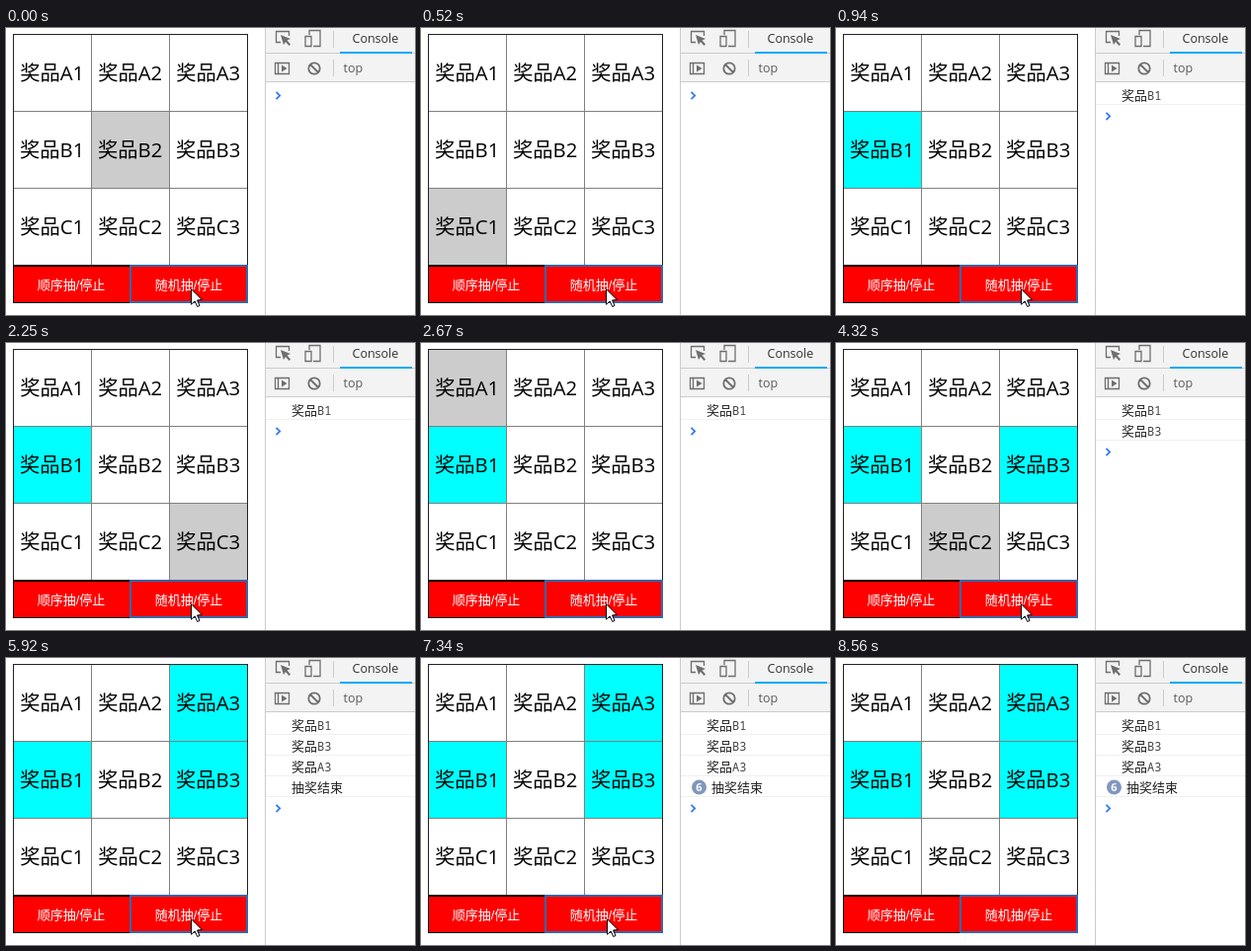
These frames come from a looping animation (414 px wide and 291 px high, 8690 ms). An HTML page with a canvas:

```html
<!DOCTYPE html>
<html lang="zh-CN">
<head>
<meta charset="utf-8">
<title>抽奖</title>
<style>
html, body { margin: 0; width: 100%; height: 100%; overflow: hidden; background: #fff; }
canvas { display: block; }
</style>
</head>
<body>
<canvas id="stage" width="414" height="291"></canvas>
<script>
const ctx = document.getElementById('stage').getContext('2d');
const LOOP = 8690;
const CJK = '"Noto Sans CJK SC", "Noto Sans CJK", "Noto Sans CJK JP", sans-serif';
const UI = '"Open Sans", ' + CJK;
const INK = '#6e6e6e';

// The highlight hops along a path at a steady pace until the draw is stopped.
const HOP = 135;
const rounds = [
  { start: -20, stop: 940, prize: 'B1', path: 'B2 A1 B3 A2 C1 C2 B2' },
  { start: 2250, stop: 3210, prize: 'B3', path: 'C3 B2 C2 A1 A3 C2 A1' },
  { start: 4050, stop: 4900, prize: 'A3', path: 'C1 B2 C2 A2' }
];
const FINISHED = 5920;
const REPEAT = { start: 6640, every: 175, max: 6 };
const LEAVE = 7460, ENTER = 7990, POINTER_STEP = 140;

const icons = {
  inspect: new Path2D('M278 14.5h-4.5v-11h13v4.5'),
  arrow: new Path2D('M278 7l10 4-3.5 1.5 3.5 4-1.5 1.5-3.5-4-2 3z'),
  devices: new Path2D('M307 7v-4.5h11v16h-7M303 8.5h6v10h-6z'),
  sidebar: new Path2D('M272.5 35.5h14v11h-14zM275.5 35v12'),
  play: new Path2D('M279 37.5l5.5 3.5-5.5 3.5z'),
  clear: new Path2D('M317.7 41a5.7 5.7 0 1 1-11.4 0a5.7 5.7 0 1 1 11.4 0M308 37l8 8'),
  prompt: new Path2D('M-3.7-3.7L0 0L-3.7 3.7'),
  pointer: new Path2D('M.5.8v15.5l3.7-3.4 2.5 5.6 2.3-1-2.4-5.5 4.7-.4z')
};

function activeCell(t) {
  const round = rounds.find(r => t >= r.start && t < r.stop);
  if (!round) return '';
  const path = round.path.split(' ');
  return path[Math.min(path.length - 1, Math.floor((t - round.start) / HOP))];
}

const prizesAt = t => rounds.filter(r => t >= r.stop).map(r => r.prize);

function repeatCount(t) {
  if (t < REPEAT.start) return 1;
  return Math.min(REPEAT.max, 2 + Math.floor((t - REPEAT.start) / REPEAT.every));
}

function pointerAt(t) {
  if (t < LEAVE) return [t < 7190 ? 187 : 188, 264];
  if (t < LEAVE + 120) return [222, 240];
  const p = Math.floor((t - ENTER) / POINTER_STEP) / 3;
  if (p < 0 || p > 1) return null;
  return [345 + 31 * p - 60 * p * (1 - p), 285 - 114 * (1 - p) ** 3].map(Math.round);
}

function box(x, y, w, h, color) {
  ctx.fillStyle = color;
  ctx.fillRect(x, y, w, h);
}

function frame(x, y, w, h, color, width = 1) {
  ctx.strokeStyle = color;
  ctx.lineWidth = width;
  ctx.strokeRect(x + width / 2, y + width / 2, w - width, h - width);
}

function text(str, x, y, font, color, align = 'left') {
  ctx.font = font;
  ctx.fillStyle = color;
  ctx.textAlign = align;
  ctx.fillText(str, x, y);
}

function stroke(path, color, width) {
  ctx.strokeStyle = color;
  ctx.lineWidth = width;
  ctx.stroke(path);
}

function fill(path, color) {
  ctx.fillStyle = color;
  ctx.fill(path);
}

function at(x, y, paint) {
  ctx.save();
  ctx.translate(x, y);
  paint();
  ctx.restore();
}

function drawGrid(t) {
  const current = activeCell(t);
  const won = prizesAt(t);
  box(7, 6, 238, 235, '#808080');
  for (let r = 0; r < 3; r++) {
    for (let c = 0; c < 3; c++) {
      const id = 'ABC'[r] + (c + 1);
      const x = 8 + 79 * c, y = 7 + 78 * r;
      box(x, y, 78, 77, won.includes(id) ? '#0ff' : id === current ? '#ccc' : '#fff');
      text('奖品' + id, x + 38.7, y + 46, '20.3px ' + UI, '#000', 'center');
    }
  }
  frame(7, 6, 238, 235, '#222');
}

function drawButton(x, label) {
  box(x, 241, 119, 38, '#f00');
  frame(x, 241, 119, 38, '#000');
  text(label, x + 59, 265, '13px "Liberation Sans", ' + CJK, '#fff', 'center');
}

function drawToolbar() {
  box(262, 0, 152, 55, '#f3f3f3');
  box(262, 25, 152, 1, '#ccc');
  box(262, 54, 152, 1, '#ccc');
  box(262, 0, 1, 291, '#ccc');
  box(331, 3, 1, 17, '#ccc');
  box(331, 32, 1, 17, '#ccc');
  box(338, 24, 73, 2, '#03a9f4');
  text('Console', 350.5, 15, '12.5px ' + UI, '#333');
  text('top', 341.5, 45, '12.5px ' + UI, '#5a5a5a');
  stroke(icons.inspect, INK, 1.3);
  fill(icons.arrow, INK);
  stroke(icons.devices, INK, 1.3);
  stroke(icons.sidebar, INK, 1.3);
  fill(icons.play, INK);
  stroke(icons.clear, INK, 1.8);
}

function drawBadge(count) {
  ctx.beginPath();
  ctx.arc(281.5, 131, 7.5, 0, Math.PI * 2);
  ctx.fillStyle = '#8097bd';
  ctx.fill();
  text(count, 281.5, 135, 'bold 11px ' + UI, '#fff', 'center');
}

function drawConsole(t) {
  const hanzi = '13px ' + CJK;
  const won = prizesAt(t);
  won.forEach((id, i) => {
    const y = 73 + 21 * i;
    text('奖品', 289, y, hanzi, '#222');
    text(id, 315, y, '12px "Noto Sans Mono", monospace', '#444');
  });
  let rows = won.length;
  if (t >= FINISHED) {
    const count = repeatCount(t);
    if (count > 1) drawBadge(count);
    text('抽奖结束', count > 1 ? 294 : 289, 136, hanzi, '#222');
    rows++;
  }
  for (let i = 0; i < rows; i++) box(263, 77 + 21 * i, 151, 1, '#f0f0f0');
  at(277.2, 68.5 + 21 * rows, () => stroke(icons.prompt, '#367cf1', 1.8));
}

function drawPointer(t) {
  const pos = pointerAt(t);
  if (!pos) return;
  at(...pos, () => {
    fill(icons.pointer, '#fff');
    stroke(icons.pointer, '#000', 1);
  });
}

function draw(t) {
  box(0, 0, 414, 291, '#fff');
  drawGrid(t);
  drawButton(7, '顺序抽/停止');
  drawButton(126, '随机抽/停止');
  frame(125, 240, 120, 39, '#3568a8', 2);
  drawToolbar();
  drawConsole(t);
  drawPointer(t);
}

const begin = performance.now();
function tick() {
  draw((performance.now() - begin) % LOOP);
  requestAnimationFrame(tick);
}
tick();
</script>
</body>
</html>
```
